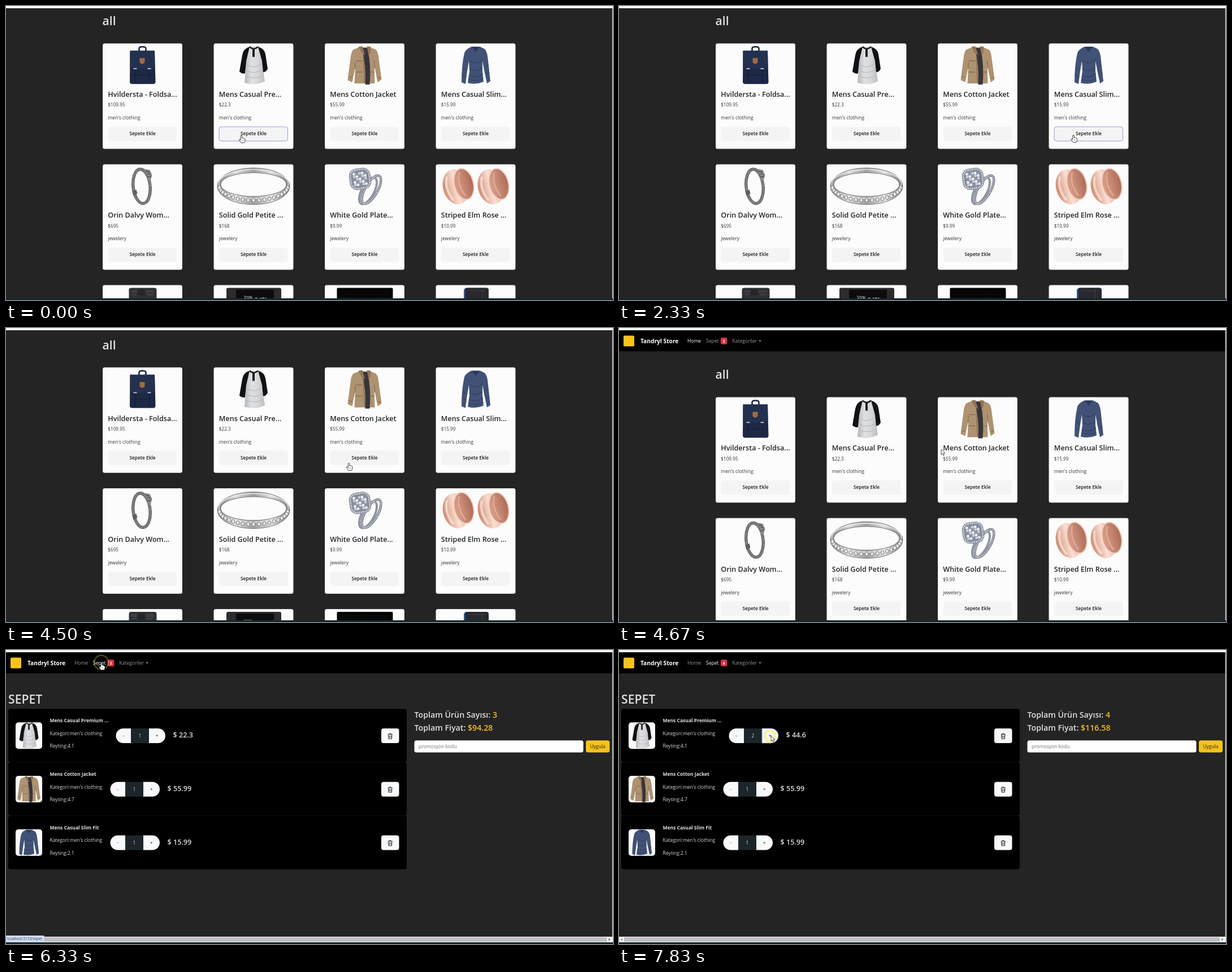
An HTML page for the animation above (8000 ms loop, 1074x521 px).

```html
<!DOCTYPE html>
<html lang="tr">
<head>
<meta charset="utf-8">
<title>Shop</title>
<style>
html, body { margin: 0; width: 100%; height: 100%; overflow: hidden; background: #242424; }
svg { display: block; width: 1074px; height: 521px; font-family: "Open Sans", "Noto Sans", sans-serif; }
</style>
</head>
<body>
<svg id="stage" viewBox="0 0 1074 521" xmlns="http://www.w3.org/2000/svg"></svg>
<script>
const FPS = 6, LOOP = 8000, TOP = 56.3;
const PAGE_FRAME = 38, ADD_FRAME = 47;

const rect = (x, y, w, h, fill, rx = 0, more = "") =>
  `<rect x="${x}" y="${y}" width="${w}" height="${h}" fill="${fill}" rx="${rx}" ${more}/>`;
const text = (x, y, size, str, fill, weight = 400, more = "") =>
  `<text x="${x}" y="${y}" font-size="${size}" fill="${fill}" font-weight="${weight}" ${more}>${str}</text>`;
const path = (d, fill, more = "") => `<path d="${d}" fill="${fill}" ${more}/>`;
const line = (d, stroke, w = 1, more = "") =>
  `<path d="${d}" fill="none" stroke="${stroke}" stroke-width="${w}" ${more}/>`;
const oval = (cx, cy, rx, ry, fill, more = "") =>
  `<ellipse cx="${cx}" cy="${cy}" rx="${rx}" ry="${ry}" fill="${fill}" ${more}/>`;
const group = (id, body, more = "") => `<g id="${id}" ${more}>${body}</g>`;
const use = (id, x, y, s = 1) => `<use href="#${id}" transform="translate(${x} ${y}) scale(${s})"/>`;
const grad = (id, ...stops) => `<linearGradient id="${id}">` + stops.map((c, i) =>
  `<stop offset="${i / (stops.length - 1)}" stop-color="${c}"/>`).join("") + `</linearGradient>`;
const mid = 'text-anchor="middle"';

// Product pictures, centred on 0,0 and about 68 high
const beads = Array.from({ length: 19 }, (_, i) => {
  const a = (8 + i * 9.1) * Math.PI / 180;
  return oval(61 * Math.cos(a), 26 * Math.sin(a) - 1, 2.8, 3.4, "#e9e9e9", 'stroke="#6f6f6f" stroke-width=".9"');
}).join("");
const facets = Array.from({ length: 25 }, (_, i) =>
  rect(-12 + i % 5 * 4.9, -12 + (i / 5 | 0) * 4.9, 4.4, 4.4, ["#eef0f5", "#8d93a3", "#c9ced9"][i * 7 % 3], 1)).join("");
const roseRing = x => `<g transform="translate(${x} 0)">` +
  oval(-4, 0, 23, 31.5, "url(#copper)", 'transform="rotate(-14)"') +
  line("M-20-17Q-25 4-8 25", "#fbe9e1", 4, 'opacity=".7"') +
  oval(10, -4, 17, 28, "url(#inside)", 'transform="rotate(-14 10 -4)" stroke="#f4d3c5" stroke-width="2"') +
  line("M2-25Q-3-5 13 17", "#e9b9a7", 3, 'opacity=".6"') + "</g>";

const pics = {
  bag: line("M-6-25V-30Q-6-33 0-33Q6-33 6-30V-25", "#1b2540", 2.6) +
    path("M-22-26H21.5L23 29Q23 33 19 33H-18Q-22.5 33-22.5 29Z", "#1d2945") +
    path("M-22-26H21.5L22 4Q0 8-22 4Z", "#23304f") +
    line("M-13 5V31M12 5V31M-21 17H21", "#151f37", 1.2) +
    path("M-5-13H4V-5L-.5-2L-5-5Z", "#a06a43") +
    rect(-16, 5, 6, 1.8, "#c9cdd6") + rect(9, 5, 6, 1.8, "#c9cdd6"),
  raglan: path("M-9-33H9L15-26L16-8L17 8L20 28Q4 37-16 31L-14 8V-8L-15-26Z", "url(#cotton)") +
    path("M-7-33Q-18-30-20-18L-25 11Q-20 16-15 14L-13-8Z", "#101113") +
    path("M8-33Q19-30 21-20L25 6Q22 12 17 12L15-8Z", "#101113") +
    line("M-7-33Q0-26 8-33", "#18191b", 2.4) + rect(-2, -29, 4, 14, "#1b1c1e") +
    line("M-11 10Q2 16 15 8M-12 20Q4 25 17 18M-9 0Q2 6 12-2", "#b2b3b6", 1),
  jacket: path("M-10-32H10L20-28Q24-24 25-12L30 25L23 30L18 4L17-6L18 32H-18L-16-6L-17 5L-22 30L-30 26L-25-12Q-24-24-20-28Z", "#ae9271") +
    path("M-5-31H5Q12 0 9 34H1Q3 0-5-31Z", "#37353a") +
    path("M-11-33L-4-34L1-18L-5-22ZM11-33L4-34L7-18L10-22Z", "#917555") +
    line("M-16-6L-17 6M18 5L17-8M-15-8H-4M-16 12H-4M11 12H17M-2-15L0 31M-28 20L-22 22M23 23L29 21", "#7e6749", 1.2),
  sweater: path("M-8-33H8L16-29Q21-24 22-8L26 28L20 32L15 8L12-8V10L14 29Q0 35-14 31L-11 10L-12-8L-15 10L-18 33L-25 30Q-25 0-20-22Q-18-28-8-33Z", "#415276") +
    path("M-7-33H7L0-24Z", "#2a3757") +
    line("M-11-8Q2 0 12-10M-11 6Q0 13 12 4M-12 18Q2 24 13 15M-12 25Q2 30 13 23M-21 6L-17 8M18 2L22 0M-22 17L-18 19M20 15L24 13", "#313f5f", 1.2),
  bracelet: `<g transform="rotate(-6)">` + oval(-1.5, 0, 15, 30.5, "none", 'stroke="#5a5a5a" stroke-width="5.4"') +
    oval(-1.5, 0, 15, 30.5, "none", 'stroke="#a6a6a6" stroke-width="3.4" stroke-dasharray="1.2 1.4"') + "</g>" +
    path("M2-31L13-29L17-20L14-9L8-12L10-21Z", "#8c8c8c") + line("M6-27L12-25M9-16L15-18M10-23L14-21", "#3f3f3f", 1.3) +
    path("M-18 9L-11 6L-9 13L-16 17Z", "#5f5f5f"),
  band: oval(0, 0, 64, 32.5, "url(#steel)", 'stroke="#777" stroke-width="1"') +
    oval(0, -4, 61.5, 25.5, "url(#steel)", 'stroke="#f2f2f2" stroke-width="1.4"') +
    oval(0, -3, 58, 21, "#fcfcfc", 'stroke="#868686" stroke-width="1.2"') + beads,
  diamond: oval(12, 6, 11, 28, "none", 'transform="rotate(30 12 6)" stroke="#777c89" stroke-width="4.4"') +
    oval(6, 8, 11, 26, "none", 'transform="rotate(28 6 8)" stroke="#9095a1" stroke-width="4"') +
    oval(12, 6, 11, 28, "none", 'transform="rotate(30 12 6)" stroke="#dfe2e8" stroke-width="2" stroke-dasharray="1.6 1.4"') +
    `<g transform="translate(-8 -13) rotate(-8)">` + rect(-19, -19, 38, 38, "#858b9a", 13) +
    rect(-16.5, -16.5, 33, 33, "none", 10, 'stroke="#dfe2e9" stroke-width="2.6" stroke-dasharray="1.8 1.5"') + facets + "</g>",
  rose: roseRing(-31) + roseRing(31),
  drive: rect(-24, -34, 49, 68, "#303134", 4) + rect(-20, -30, 40, 5, "#3d3e42", 2) +
    rect(-9, -31, 14, 11, "#25262a", 2) + line("M-18-22H-11M8-22H18", "#56585c"),
  disk: rect(-48, -34, 97, 68, "#2e2b2c", 3) + rect(-31, -31, 67, 62, "#0c0c0e") +
    text(-17, -18, 4, "Storage", "#d0d0d0", 600) + text(-17, -11, 9, "SSD DATA", "#eee", 700),
  chip: rect(-49, -34, 99, 68, "#050506", 2) +
    line("M-44-27H44M-44-22H44M-44-17H44", "#2b2b2e", 1, 'stroke-dasharray="1 3"'),
  pocket: rect(-21, -34, 44, 68, "#2f55a8", 5) + rect(-18.5, -34, 41.5, 68, "#27292d", 4) + line("M-14-29H18M12-32V-10", "#3f4146")
};

const goods = [
  ["bag", "Hvildersta - Foldsa...", "$109.95"], ["raglan", "Mens Casual Pre...", "$22.3"],
  ["jacket", "Mens Cotton Jacket", "$55.99"], ["sweater", "Mens Casual Slim...", "$15.99"],
  ["bracelet", "Orin Dalvy Wom...", "$695"], ["band", "Solid Gold Petite ...", "$168"],
  ["diamond", "White Gold Plate...", "$9.99"], ["rose", "Striped Elm Rose ...", "$10.99"],
  ["drive"], ["disk"], ["chip"], ["pocket"]
];
const cardAt = i => [171 + i % 4 * 196.5, 66.2 + (i / 4 | 0) * 214.2];

function card([pic, name, price], i) {
  const [x, y] = cardAt(i);
  return rect(x, y, 141, 187, "#fcfcfc", 3.5) +
    rect(x + .3, y + .3, 140.4, 186.4, "none", 3.3, 'stroke="#000" stroke-opacity=".175" stroke-width=".6"') +
    use(pic, x + 70.5, y + 39) + (name ?
    text(x + 9.3, y + 95, 12.6, name, "#212529", 600) +
    text(x + 9.3, y + 112.2, 8.2, price, "#33373b") +
    text(x + 9.3, y + 135, 8.5, i < 4 ? "men's clothing" : "jewelery", "#33373b") +
    rect(x + 9.5, y + 147.8, 121.5, 25.2, "#f4f4f4", 4, `id="btn${i}"`) +
    text(x + 70.5, y + 163, 8.3, "Sepete Ekle", "#1b1b1b", 600, mid) : "");
}

function cartRow([pic, name, price, rating], i) {
  const y = 104.2 + i * 94.8, x = i ? 184.5 : 194.5, id = i ? "" : ' id="qty"';
  const pill = (d, more = "") => path(d, "#f8f9fa", `transform="translate(${x} ${y + 34.8})" ${more}`);
  return rect(4, y, 705, 94.6, "#000", 4) + rect(17, y + 24, 47, 47, "#fcfcfc", 5) + use(pic, 40.5, y + 47.5, .68) +
    text(77.5, y + 24, 8.5, name, "#e0e0e0", 700) +
    text(77.5, y + 46.5, 8.5, "Kategori:men's clothing", "#d8d8d8") +
    text(77.5, y + 69, 8.5, "Reyting:" + rating, "#d8d8d8") +
    rect(x + 26, y + 34.8, 33, 26, "#1c2529") +
    pill("M26.5 0H13A13 13 0 0 0 13 26H26.5Z") +
    pill("M58.5 0H74.5A13 13 0 0 1 74.5 26H58.5Z", i ? "" : 'id="plus"') +
    text(x + 13, y + 50.5, 8.3, "-", "#222", 400, mid) +
    text(x + 42.3, y + 51, 8.3, "1", "#d8d8d8", 400, mid + id) +
    text(x + 72.5, y + 50.8, 8.3, "+", "#222", 400, mid) +
    text(x + 101, y + 50.8, 12.6, "$ " + price, "#dedede", 600, i ? "" : 'id="price"') +
    rect(664, y + 34.8, 31.5, 26, "#f8f9fa", 4) +
    line("M-4-3.5H4M-1.4-3.7V-4.7H1.4V-3.7M-3.2-3.4L-2.8 4.5H2.8L3.2-3.4M-1.2-1.5V2.8M1.2-1.5V2.8", "#222", 1,
      `transform="translate(679.7 ${y + 48.6})"`);
}

const nav = rect(0, 4, 1073, 37.3, "#000") + rect(8, 13.5, 19, 19, "#f7c31c", 2) +
  text(38, 27, 10.2, "Tandryl Store", "#fff", 700) +
  text(121, 26, 8.5, "Home", "#fff", 400, 'id="home"') + text(154, 26, 8.5, "Sepet", "#999", 400, 'id="sepet"') +
  rect(179.8, 17, 11.6, 12, "#d63343", 3) + text(185.6, 25.7, 7, "3", "#fff", 700, mid + ' id="badge"') +
  text(200.5, 26, 8.5, "Kategoriler", "#999") + path("M247 21.8H252L249.5 24.3Z", "#999");

const shop = text(170.5, 34.2, 21.2, "all", "#e0e0e2", 600) + goods.map(card).join("");

const cart = text(4, 95.3, 21.2, "SEPET", "#e0e0e2", 600) +
  [["raglan", "Mens Casual Premium ...", "22.3", "4.1"], ["jacket", "Mens Cotton Jacket", "55.99", "4.7"],
   ["sweater", "Mens Casual Slim Fit", "15.99", "2.1"]].map(cartRow).join("") +
  text(722.5, 119.8, 14.2, 'Toplam Ürün Sayısı: <tspan id="count" fill="#f4bd23">3</tspan>', "#e0e0e2", 600) +
  text(722.5, 143.4, 14.2, 'Toplam Fiyat: <tspan id="total" fill="#f4bd23">$94.28</tspan>', "#e0e0e2", 600) +
  rect(722.5, 160.2, 299, 21.4, "#fff", 3.5) + text(730, 174, 8.5, "promosyon kodu", "#6b7075") +
  rect(1026, 160.2, 42, 21.4, "#f5c31c", 3.5) + text(1047, 174, 8.5, "Uygula", "#222", 400, mid) +
  rect(0, 508, 1073, 10, "#f1f1f1") + rect(9, 509, 1054, 8, "#c1c1c1") +
  path("M5.5 511V515L3 513Z", "#777") + path("M1066.5 511V515L1069 513Z", "#444");

const arrow = path("M0 0V9.6L2.3 7.5L3.8 11L5.5 10.2L4 6.9H7Z", "#fff", 'stroke="#111" stroke-width=".7"');
const hand = path("M-1.2 1Q0-.8 1.2 1V5Q2.5 4 3.3 5.4Q4.8 4.6 5.2 6Q6.5 5.8 6.5 7.2V9.5Q6.3 12 5 13.4H-.5Q-2 11.5-4 8.2Q-4.2 6.6-2.6 7.2L-1.2 8.6Z",
  "#fff", 'stroke="#111" stroke-width=".8"') + line("M1.6 8V11M3.4 8V11", "#777", .6);

const stage = document.getElementById("stage");
stage.innerHTML = "<defs>" +
  grad("cotton", "#b4b5b8", "#dfe0e2", "#d6d7d9", "#bcbdc0") + grad("steel", "#858585", "#dcdcdc", "#9d9d9d", "#e2e2e2", "#7c7c7c") +
  grad("copper", "#cf8a70", "#fbe0d4", "#dc9c83") + grad("inside", "#dba08b", "#c58672", "#ad6b56") +
  Object.entries(pics).map(([id, body]) => group(id, body)).join("") + "</defs>" +
  rect(0, 0, 1074, 521, "#242424") + group("shop", shop) + group("cart", cart) + group("nav", nav) +
  rect(0, 0, 1074, 4, "#f3fbf8") + rect(1072.8, 0, 1.2, 518, "#dfe9e6") + rect(0, 518, 1074, 3, "#15272d") +
  group("status", rect(-2, 506, 69.8, 12, "#cfdcf6", 2) + text(2, 514.2, 6.4, "localhost:5173/sepet", "#3c4043")) +
  `<circle id="ring" fill="none" stroke="#f7ee3c"/>` + group("arrow", arrow) + group("hand", hand);
const el = Object.fromEntries([...stage.querySelectorAll("[id]")].map(e => [e.id, e]));

// frame, x, y of the pointer tip
const route = [
  [0, 416.5, 229], [2, 425, 229], [6, 580, 228], [8, 608, 227], [9, 619.5, 227], [13, 800, 228], [16, 812, 229],
  [17, 810, 231], [21, 727.5, 335.5], [27, 606.5, 239], [28, 570, 215], [33, 178, 30], [34, 168.5, 22],
  [41, 168.5, 22], [45, 264, 150], [46, 269, 152], [48, 269, 152]
];
// frame: x, y, radius, width, opacity
const rings = {
  9: [608, 228, 6.5, 5, .8], 10: [608, 228, 11, 3, .4], 16: [812, 229, 6.5, 5, .8], 17: [812, 229, 11, 3, .4],
  38: [168.5, 22, 12.5, 2.5, .3], 47: [267, 152.5, 9.5, 4, .5]
};

function tip(f) {
  const i = Math.max(1, route.findIndex(k => k[0] >= f));
  const [a, x0, y0] = route[i - 1], [b, x1, y1] = route[i];
  const p = (f - a) / (b - a);
  return [x0 + (x1 - x0) * p, y0 + (y1 - y0) * p];
}
const scrollAt = f => f < 27 ? 0 : f < 28 ? 3.5 : TOP;

function hovered(f) {
  if (f >= PAGE_FRAME) return -1;
  const [x, y] = tip(f), s = scrollAt(f);
  return goods.findIndex((g, i) => {
    const [cx, cy] = cardAt(i);
    return g[1] && x > cx + 9.5 && x < cx + 131 && y > cy + s + 147.8 && y < cy + s + 173;
  });
}

const show = (e, on) => e.setAttribute("visibility", on ? "visible" : "hidden");
const set = (e, attrs) => Object.entries(attrs).forEach(([k, v]) => e.setAttribute(k, v));
const outline = (e, on) => set(e, { stroke: on ? "#7d83d6" : "none", "stroke-width": .8 });

function draw(f) {
  const inCart = f >= PAGE_FRAME, added = f >= ADD_FRAME, scroll = scrollAt(f);
  const [x, y] = tip(f), over = hovered(f);
  const onLink = scroll === TOP && x > 153 && x < 193 && y > 13 && y < 33;
  show(el.shop, !inCart);
  show(el.cart, inCart);
  el.shop.setAttribute("transform", `translate(0 ${scroll})`);
  el.nav.setAttribute("transform", `translate(0 ${scroll - TOP})`);
  el.home.setAttribute("fill", inCart ? "#999" : "#fff");
  el.sepet.setAttribute("fill", inCart ? "#fff" : onLink ? "#bdbdbd" : "#999");

  // The outline fades in, so it needs a frame of hover first
  const lit = over === hovered(Math.max(0, f - 1)) ? over : -1;
  goods.forEach((g, i) => g[1] && outline(el["btn" + i], i === lit));
  outline(el.plus, added);

  el.badge.textContent = el.count.textContent = added ? 4 : 3;
  el.qty.textContent = added ? 2 : 1;
  el.price.textContent = added ? "$ 44.6" : "$ 22.3";
  el.total.textContent = added ? "$116.58" : "$94.28";
  show(el.status, f >= 34 && f < 44);

  const ring = rings[f];
  show(el.ring, ring);
  if (ring) {
    const [cx, cy, r, w, o] = ring;
    set(el.ring, { cx, cy, r, "stroke-width": w, "stroke-opacity": o });
  }
  const pointing = over >= 0 || onLink;
  show(el.hand, pointing);
  show(el.arrow, !pointing);
  (pointing ? el.hand : el.arrow).setAttribute("transform", `translate(${x} ${y})`);
}

let last = -1;
function tick() {
  const f = Math.min(47, Math.floor((performance.now() % LOOP + 5) * FPS / 1000));
  if (f !== last) draw(last = f);
  requestAnimationFrame(tick);
}
tick();
</script>
</body>
</html>
```
